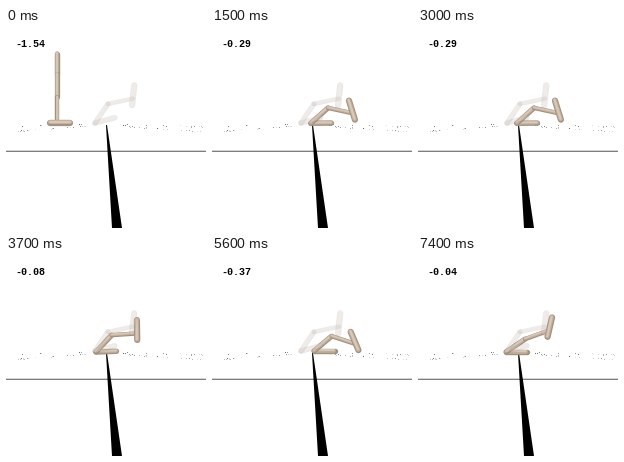
A matplotlib script for the animation above (8 s loop, 200x200 px).

```python
import numpy as np
import matplotlib.pyplot as plt
from matplotlib.animation import FuncAnimation

SIZE, DPI = 200, 100
PT = 72 / DPI
STEP, FRAMES, LAST = 100, 80, 74

TORSO, THIGH, LEG, HEEL, TOE = 20.5, 23.0, 25.5, 6.6, 13.3
WIDTHS = (5.4, 5.2, 4.4, 6.2)

# hip x, hip y, then torso, thigh, leg and foot angles in degrees, score
STAND = np.array([51, 46, 90, -90, -90, 0, -1.54])
FALL = np.array([86, 81, -25, 68, -60, 3, -0.41])
REST = np.array([88, 96, 0, 34, 20, 77, -0.035])
LOW = np.array([90, 96, 2, 47, 4, 91, -0.08])
LIFT = np.array([97.5, 96, 25, 60, 30, 92, -0.25])
KICK = np.array([102, 95, 0, 40, -18, 113, -0.37])
GOAL = np.array([89, 95, 15, 56, 12, 84])

TIMELINE = [(0, STAND), (900, FALL), (1350, KICK), (1800, LOW), (2200, REST),
            (2700, LOW), (3150, KICK), (3700, LOW), (4600, LIFT),
            (5600, KICK), (6700, LOW), (7400, REST)]

BODY = ("#a3917f", "#c2b09f", "#d8c8b8")


def state(t):
    """Ease from one pose of the timeline to the next."""
    for (t0, a), (t1, b) in zip(TIMELINE, TIMELINE[1:]):
        if t <= t1:
            break
    u = (t - t0) / (t1 - t0)
    return a + (b - a) * u * u * (3 - 2 * u)


def ray(deg, length):
    r = np.radians(deg)
    return np.array([np.cos(r), -np.sin(r)]) * length


def segments(pose):
    hip = pose[:2]
    torso, thigh, leg, foot = pose[2:6]
    knee = hip + ray(thigh, THIGH)
    ankle = knee + ray(leg, LEG)
    return [
        (hip + ray(torso, TORSO), hip),
        (hip, knee),
        (knee, ankle),
        (ankle - ray(foot, HEEL), ankle + ray(foot, TOE)),
    ]


class Hopper:
    """Four capsules, each shaded with nested strokes."""

    def __init__(self, ax, colors, alpha=1, z=3):
        self.parts = [
            [ax.plot([], [], color=c, alpha=alpha, lw=w * (1 - 0.32 * k) * PT,
                     solid_capstyle="round", zorder=z)[0]
             for k, c in enumerate(colors)]
            for w in WIDTHS
        ]

    def pose(self, pose):
        for strokes, (p, q) in zip(self.parts, segments(pose)):
            for k, line in enumerate(strokes):
                line.set_data([p[0] - 0.2 * k, q[0] - 0.2 * k],
                              [p[1] - 0.4 * k, q[1] - 0.4 * k])


def draw_floor(ax):
    rng = np.random.default_rng(4)
    for base, bend, count in ((96, 3, 22), (97, 7, 48)):
        x = rng.uniform(0, SIZE, count)
        x = x[np.abs(x - 100) > 16]
        y = base + bend * np.abs(x / 100 - 1) + rng.uniform(-0.5, 0.5, len(x))
        ax.scatter(x, y, s=0.55, marker="s", c=rng.uniform(0.4, 0.9, len(x)),
                   cmap="gray", vmin=0, vmax=1, linewidths=0, zorder=1)
    ax.plot([0, SIZE], [123.3, 123.3], color="#707070", lw=1.2 * PT,
            snap=False, zorder=1)
    ax.fill([100, 101, 116, 106], [97, 97, 200, 200],
            color="black", lw=0, zorder=2)


fig = plt.figure(figsize=(SIZE / DPI, SIZE / DPI), dpi=DPI, facecolor="white")
ax = fig.add_axes([0, 0, 1, 1])
ax.set_xlim(0, SIZE)
ax.set_ylim(SIZE, 0)
ax.axis("off")

draw_floor(ax)
hopper = Hopper(ax, BODY)
ghost = Hopper(ax, ("#8c7868", "white"), alpha=0.17, z=4)
ghost.pose(GOAL)
label = ax.text(9.5, 19, "", family="Liberation Mono", weight="bold",
                size=10 * PT, color="black", va="baseline", zorder=9)


def update(i):
    now = state(min(i, LAST) * STEP)
    hopper.pose(now)
    label.set_text(f"{now[-1]:.2f}")
    return []


anim = FuncAnimation(fig, update, frames=FRAMES, interval=STEP,
                     repeat=True, repeat_delay=0, blit=False)
plt.show()
```
